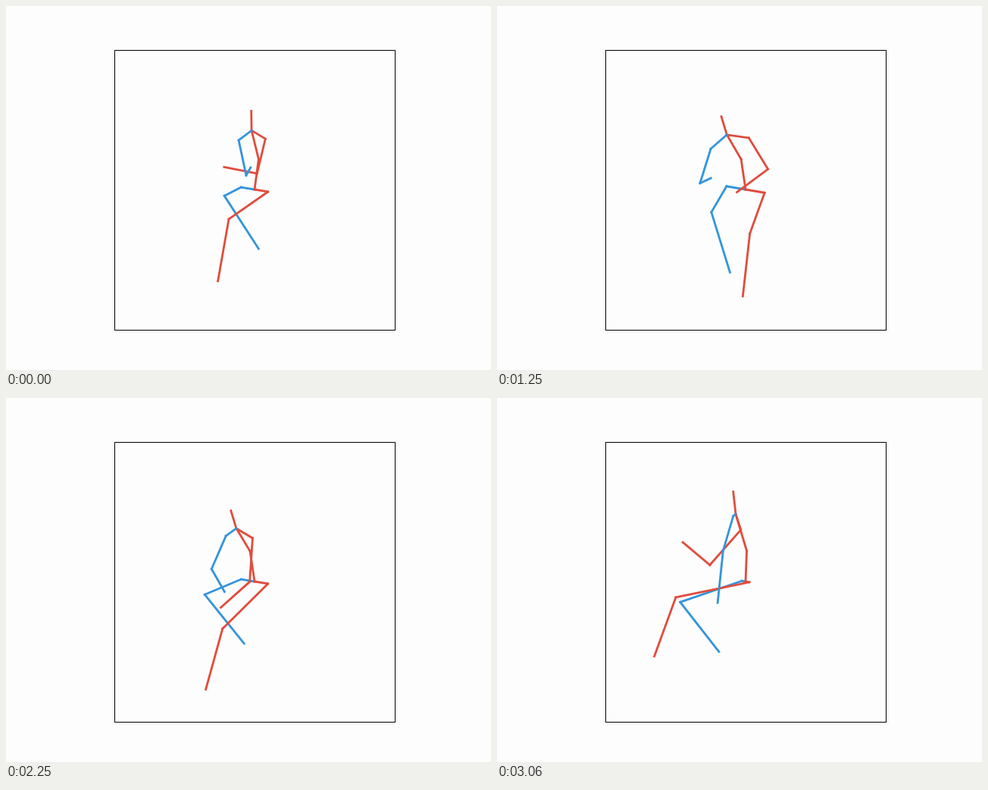
An HTML page with a canvas for the animation above (3.12 s loop, 640 by 480 pixels).

```html
<!DOCTYPE html>
<html lang="en">
<head>
<meta charset="utf-8">
<title>Stick figure</title>
<style>
  html, body { margin: 0; width: 100%; height: 100%; overflow: hidden; background: #fdfdfd; }
  canvas { display: block; }
</style>
</head>
<body>
<canvas id="stage" width="640" height="480"></canvas>
<script>
const ctx = document.getElementById('stage').getContext('2d');
const LOOP = 3120, STEPS = 50;
const BLUE = '#3494db', RED = '#e04c3c';
const { sin, cos, max, min, PI } = Math;

// Steps of the key poses; values run on a smooth curve between them.
const keys = [0, 8, 16, 25, 32, 41, 49];

function slope(v, i) {
  const a = max(i - 1, 0), b = min(i + 1, keys.length - 1);
  return (v[b] - v[a]) / (keys[b] - keys[a]);
}

const track = (...v) => step => {
  let i = 0;
  while (i < keys.length - 2 && step >= keys[i + 1]) i++;
  const d = keys[i + 1] - keys[i], u = (step - keys[i]) / d;
  const u2 = u * u, u3 = u2 * u;
  return v[i] * (2 * u3 - 3 * u2 + 1) + v[i + 1] * (3 * u2 - 2 * u3) +
    d * (slope(v, i) * (u3 - 2 * u2 + u) + slope(v, i + 1) * (u3 - u2));
};

// Angles in degrees: the torso leans from upright, limbs swing from straight down.
const lean = track(-2.9, 1.5, -2.5, -38.8, -30, -6.5, -8.3);
const torso = track(78, 78, 79, 72, 68, 83.5, 90);
const blue = {
  thigh: track(-63, -7, -21, -43.5, -65, -67, -71),
  thighLength: track(25, 20, 29, 52, 50, 59, 86),
  shin: track(33, 27, 12, 29, 45, 29, 38),
  upperArm: track(12, 11, -16, -15.6, -22, -23.4, -16.4),
  forearm: track(151, 192, 160, 62, 74, -27, -6)
};
const red = {
  thigh: track(-55, -58.5, -27.6, -15.7, -22.7, -73.8, -78.4),
  thighLength: track(63, 58, 47, 74, 80, 90, 99),
  shin: track(-10, -2, -2, -12, -10, -22.5, -20),
  upperArm: track(-13.5, -13, 11.4, 50, 21, -32, -41.4),
  forearm: track(-101, -112, -89, -10.5, -16, -94, -130)
};

const bone = ([x, y], length, deg) =>
  [x + length * sin(deg * PI / 180), y + length * cos(deg * PI / 180)];

function pose(step) {
  // Turning the body narrows hips and shoulders and brings one side forward.
  const yaw = (step - 18) * 0.0443;
  const turn = 25.2 * cos(yaw), rise = max(0, sin(yaw));
  const tip = lean(step), tipSin = sin(tip * PI / 180);

  const pelvis = [328, 242];
  const spine = bone(pelvis, 40.5, 180 - tip - 10.5);
  const neck = bone(pelvis, torso(step), 180 - tip);
  const head = bone(neck, torso(step) * 0.33, 180 - tip - 2);
  const chest = bone(neck, 12, -tip);

  const leg = (side, s) => {
    const hip = [pelvis[0] + side * turn, pelvis[1] + side * turn * 0.17];
    const knee = bone(hip, s.thighLength(step), s.thigh(step));
    return [pelvis, hip, knee, bone(knee, 83, s.shin(step))];
  };
  const arm = (side, s, upper, lower) => {
    const shoulder = [chest[0] + side * turn, chest[1] + side * (turn * tipSin + 10 * rise)];
    const elbow = bone(shoulder, upper, s.upperArm(step));
    return [neck, shoulder, elbow, bone(elbow, lower, s.forearm(step))];
  };

  return [
    [BLUE, leg(-1, blue)],
    [RED, leg(1, red)],
    [RED, [pelvis, spine, neck, head]],
    [RED, arm(1, red, 47 + 15 * rise, 43 - 25 * tipSin)],
    [BLUE, arm(-1, blue, 47.5, 12 + 57 * (step / 49) ** 3)]
  ];
}

function drawBones(color, joints) {
  ctx.strokeStyle = color;
  for (let i = 1; i < joints.length; i++) {
    ctx.beginPath();
    ctx.moveTo(...joints[i - 1]);
    ctx.lineTo(...joints[i]);
    ctx.stroke();
  }
}

function draw(step) {
  ctx.fillStyle = '#fdfdfd';
  ctx.fillRect(0, 0, 640, 480);
  ctx.lineCap = 'square';
  ctx.lineWidth = 2.8;
  for (const [color, joints] of pose(step)) drawBones(color, joints);
  ctx.strokeStyle = '#000';
  ctx.lineWidth = 1;
  ctx.strokeRect(143.5, 58.5, 370, 369);
}

// Steps last 62.5 ms each, with their starts rounded to 10 ms.
const stepAt = t => min(STEPS - 1, Math.floor((t + 5) / 62.5));

const start = performance.now();
function tick() {
  draw(stepAt((performance.now() - start) % LOOP));
  requestAnimationFrame(tick);
}
tick();
</script>
</body>
</html>
```
